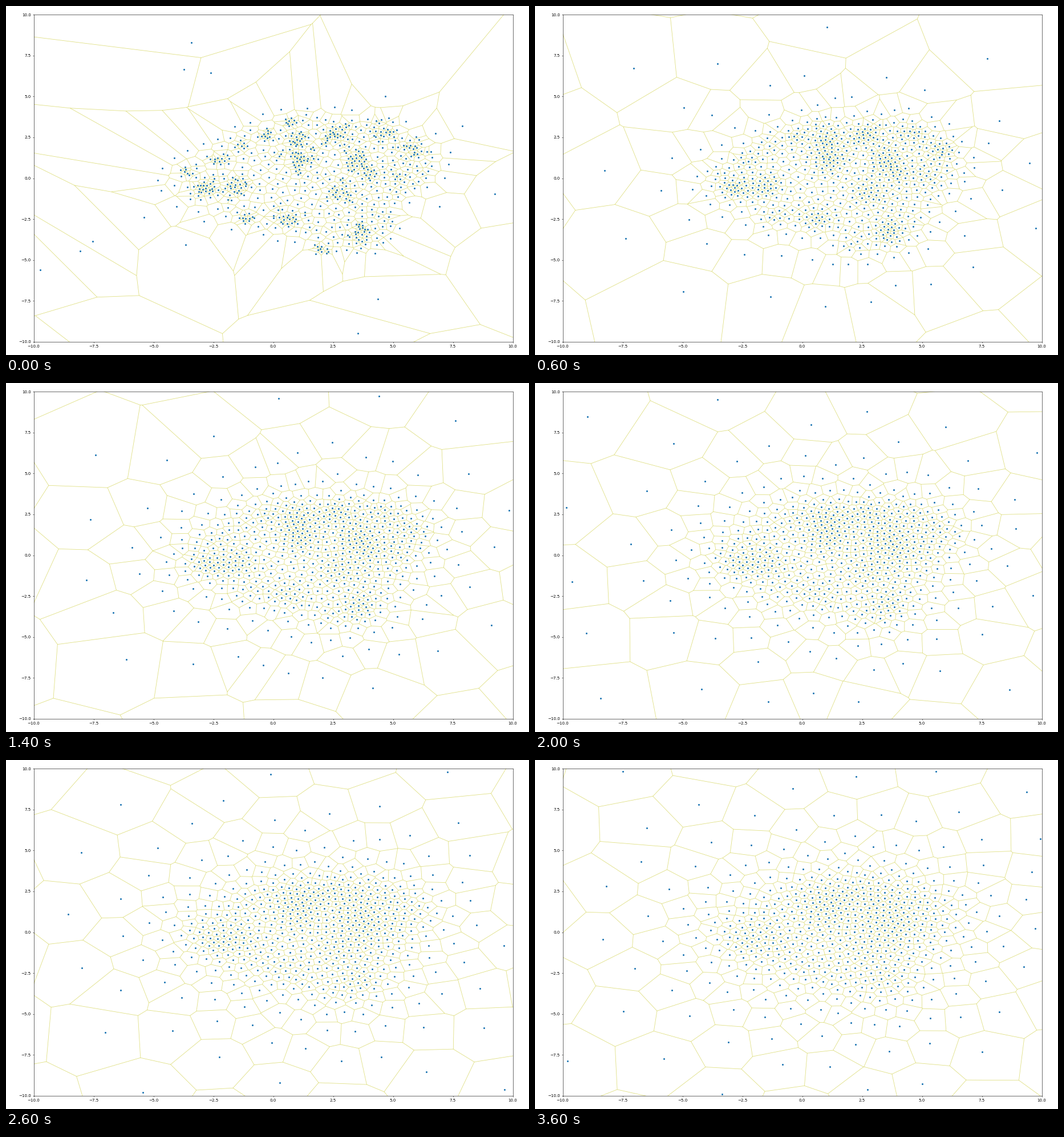
Animation of 917x611 px, one loop 3.8 s. Source, as a matplotlib script:

```python
import numpy as np
import matplotlib.pyplot as plt
from matplotlib.animation import FuncAnimation
from matplotlib.collections import LineCollection
from matplotlib.tri import Triangulation

W, H, DPI = 917, 611, 64
FRAMES, INTERVAL = 19, 200
LIMIT = 30  # cell corners further out are pulled back to this

# Centres of the wide and the tight blobs of sites
WIDE = [(-2.9, -.6), (-1.5, -.5), (1, 2.2), (1.1, 1), (3.5, 1.1), (4.5, 2.9),
        (5.9, 1.8), (2.8, -.9), (.6, -2.2), (3.7, -3.5), (2.7, 2.7)]
TIGHT = [(-3.6, .3), (-2.25, 1.15), (-1.3, 1.9), (-.2, 2.7), (.7, 3.5),
         (-1.1, -2.5), (2, -4.4), (5.3, 0), (4, .2)]

# Lone sites far from the cloud
FAR = [(-3.42, 8.3), (-3.72, 6.65), (-2.6, 6.45), (4.67, 5.03), (7.9, 3.2),
       (9.25, -.95), (6.95, -1.72), (4.38, -7.4), (3.53, -9.5), (-5.4, -2.4),
       (-7.53, -3.85), (-8.05, -4.45), (-9.73, -5.6), (10.15, -4.67),
       (5.7, -12.4), (-7.73, -10.16), (-8.45, -10.8), (-3.65, -4.07)]


def cloud_level(x, y):
    """Below 1 inside the cloud: a tilted lens with a lobe at the bottom."""
    u, v = (x - 1.3) / 5.5, (y - .3 - .1 * (x - 1.3)) / 3.6
    lens = abs(u) ** 1.5 + abs(v) ** 1.5
    lobe = ((x - 3.2) / 2) ** 2 + ((y + 2.8) / 1.8) ** 2
    return min(lens, lobe)


def scatter_sites():
    """Lone sites, blobs, then an even fill that is looser at the rim."""
    rng = np.random.default_rng(12)
    sites = list(FAR)

    def add(p, gap):
        d = np.array(sites) - p
        if (d ** 2).sum(1).min() > gap ** 2:
            sites.append(tuple(p))

    for centres, spread, count in ((WIDE, .36, 46), (TIGHT, .19, 20)):
        for centre in centres:
            for p in rng.normal(centre, spread, (count, 2)):
                add(p, .12)

    for x, y in rng.uniform((-5, -5.5), (7.5, 5), (5000, 2)):
        level = cloud_level(x, y)
        if level < 1:
            add((x, y), .38 - .02 * x)
        elif level < 1.28:
            add((x, y), .62)
    return np.array(sites)


def cross(u, v):
    return u[..., 0] * v[..., 1] - u[..., 1] * v[..., 0]


def circumcenters(pts, tri):
    a = pts[tri[:, 0]]
    b, c = pts[tri[:, 1]] - a, pts[tri[:, 2]] - a
    d = 2 * cross(b, c)
    d = np.where(np.abs(d) < 1e-12, 1e-12, d)
    bb, cc = (b ** 2).sum(1), (c ** 2).sum(1)
    x = (c[:, 1] * bb - b[:, 1] * cc) / d
    y = (b[:, 0] * cc - c[:, 0] * bb) / d
    return np.clip(a + np.column_stack([x, y]), -1e4, 1e4)


def cell_edges(pts, mesh, centers):
    """Finite borders between cells, then the open rays of the hull."""
    near = mesh.neighbors
    t, k = np.nonzero(near > np.arange(len(near))[:, None])
    inner = np.stack([centers[t], centers[near[t, k]]], axis=1)

    t, k = np.nonzero(near < 0)
    side = pts[mesh.triangles[t, (k + 1) % 3]] - pts[mesh.triangles[t, k]]
    out = np.column_stack([side[:, 1], -side[:, 0]])
    out /= np.linalg.norm(out, axis=1)[:, None] + 1e-12
    rays = np.stack([centers[t], centers[t] + 60 * out], axis=1)
    return np.concatenate([inner, rays])


def centroid(corners):
    mid = corners.mean(0)
    p = corners - mid
    p = p[np.argsort(np.arctan2(p[:, 1], p[:, 0]))]
    q = np.roll(p, -1, axis=0)
    w = cross(p, q)
    if w.sum() < 1e-9:
        return mid
    return mid + ((p + q) * w[:, None]).sum(0) / (3 * w.sum())


def relax(pts, mesh, centers):
    """One Lloyd step: every site moves to the centroid of its cell."""
    corner_of = mesh.triangles.ravel()
    order = np.argsort(corner_of, kind="stable")
    counts = np.bincount(corner_of, minlength=len(pts))
    cells = np.split(order // 3, np.cumsum(counts)[:-1])
    centers = np.clip(centers, -LIMIT, LIMIT)
    return np.array([centroid(centers[c]) if len(c) else p
                     for p, c in zip(pts, cells)])


def build_states():
    states, pts = [], scatter_sites()
    for _ in range(FRAMES):
        mesh = Triangulation(pts[:, 0], pts[:, 1])
        centers = circumcenters(pts, mesh.triangles)
        states.append((pts, cell_edges(pts, mesh, centers)))
        pts = relax(pts, mesh, centers)
    return states


states = build_states()

plt.rcParams["font.family"] = "DejaVu Sans"
fig = plt.figure(figsize=(W / DPI, H / DPI), dpi=DPI, facecolor="white")
ax = fig.add_axes([48.5 / W, 1 - 587.7 / H, 840 / W, 572.4 / H])
ax.set(xlim=(-10, 10), ylim=(-10, 10))
ticks = np.arange(-10, 10.1, 2.5)
ax.set_xticks(ticks)
ax.set_yticks(ticks)
ax.tick_params(labelsize=8, length=2.8, width=.64, pad=2.8)
for spine in ax.spines.values():
    spine.set_linewidth(.64)

borders = LineCollection([], colors=[(.75, .75, 0, .5)], linewidths=.9)
ax.add_collection(borders, autolim=False)
dots, = ax.plot([], [], ".", color="#1f77b4", markersize=4.8)


def draw(i):
    pts, edges = states[i]
    borders.set_segments(edges)
    dots.set_data(pts[:, 0], pts[:, 1])
    return borders, dots


anim = FuncAnimation(fig, draw, frames=FRAMES, interval=INTERVAL,
                     repeat=True, repeat_delay=0, blit=False)
plt.show()
```
